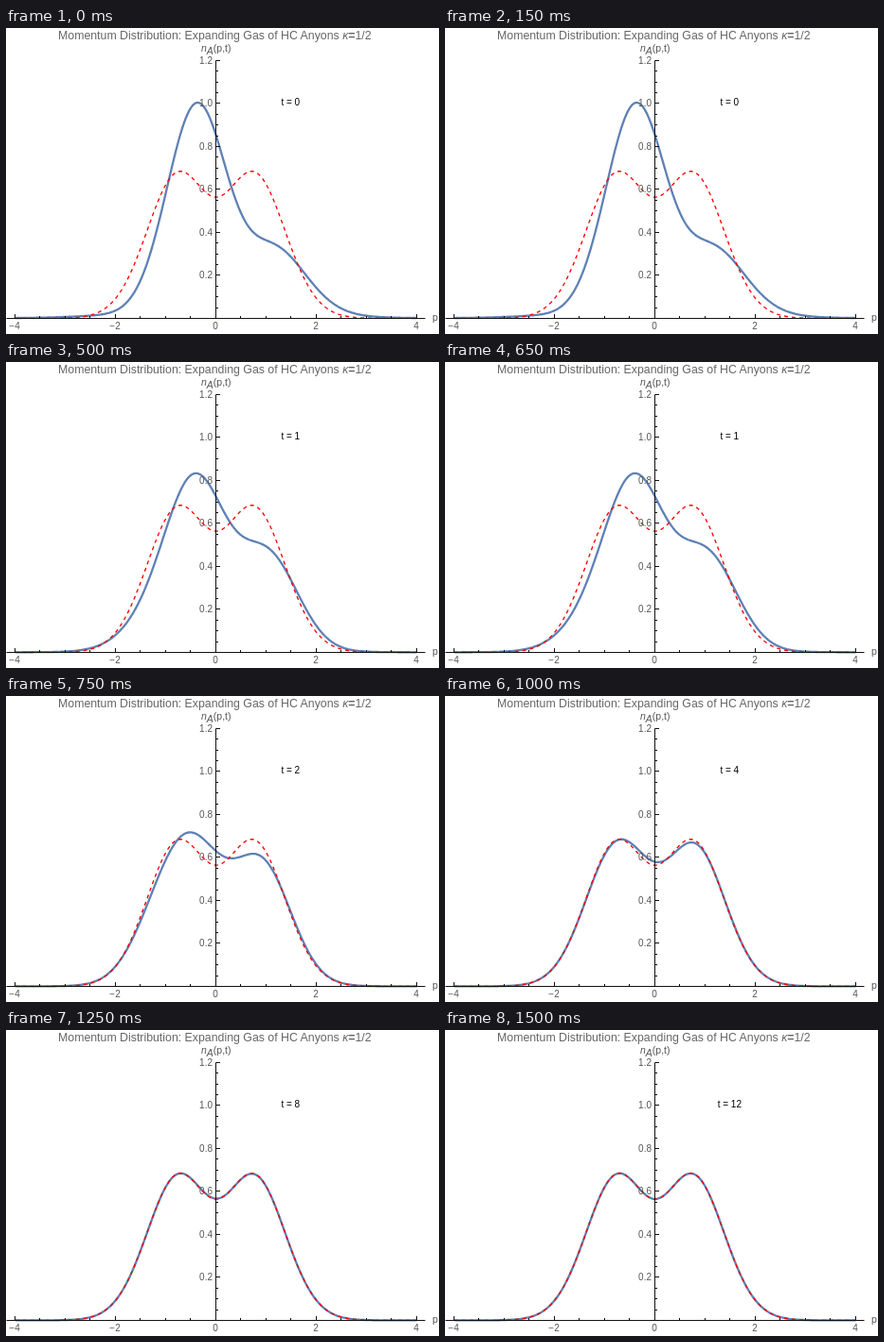
Write an HTML page that moves like this. It is 457x324 px and loops after 1.75 s.

```html
<!DOCTYPE html>
<html lang="en">
<head>
<meta charset="utf-8">
<title>Momentum distribution</title>
<style>
html, body { margin: 0; width: 100%; height: 100%; overflow: hidden; background: #fff; }
svg { display: block; }
text { font-family: "Liberation Sans", Arial, sans-serif; font-size: 10px; fill: #555; }
.title { font-size: 12.33px; fill: #666; }
.label { font-size: 10.5px; }
#time { fill: #000; }
path { fill: none; }
#axes { stroke: #111; }
#gas { stroke: #5e81b5; stroke-width: 2.3; stroke-linejoin: round; }
#limit { stroke: #f00; stroke-width: 1.35; stroke-dasharray: 4 4; }
</style>
</head>
<body>
<svg width="457" height="324" viewBox="0 0 457 324">
  <g transform="translate(.5 .5)">
    <path id="gas"/>
    <path id="limit"/>
    <path id="axes"/>
  </g>
  <g id="ticks"></g>
  <text class="title" x="55" y="12">Momentum Distribution: Expanding Gas of HC Anyons <tspan font-style="italic">κ</tspan><tspan font-weight="bold">=</tspan>1/2</text>
  <text class="label" x="206" y="25"><tspan font-style="italic">n<tspan dy="3">A</tspan></tspan><tspan dy="-3">(p,t)</tspan></text>
  <text class="label" x="450" y="310">p</text>
  <text id="time" x="300.3" y="82" text-anchor="middle"></text>
</svg>
<script>
const $ = id => document.getElementById(id);
const X = p => 221.2 + 53 * p;
const Y = n => 306.9 - 227.5 * n;
const HOLD = 250, TIMES = [0, 0.5, 1, 2, 4, 8, 12];

// Two free fermions in a harmonic trap
const fermions = p => Math.exp(-p * p) * (1 + 2 * p * p) / Math.sqrt(Math.PI);

// Exchange kernel of the pair at separation r, after expanding for time t
function kernel(r, t) {
  const steps = 60, ds = r / steps;
  let sum = 0;
  for (let i = 0; i < steps; i++) {
    const s = (i + 0.5) * ds - r / 2;
    sum += (r * r / 4 - s * s) * Math.exp(-s * s / 2) * Math.cos(s * t * r / 2);
  }
  return Math.sqrt(2 / Math.PI) * Math.exp(-r * r * (2 + t * t) / 8) * sum * ds;
}

// Anyons with statistics 1/2: fermions plus the exchange term
function anyons(t) {
  const dq = 0.1, scale = Math.hypot(1, t);
  const g = Array.from({ length: 120 }, (_, i) => kernel(i * dq / scale, t));
  return p => fermions(p) + dq / Math.PI * g.reduce((sum, k, i) =>
    sum + k * (Math.cos(p * i * dq) - Math.sin(p * i * dq)), 0);
}

function curve(f) {
  const points = [];
  for (let i = -160; i <= 160; i++) points.push(X(i / 40).toFixed(2) + "," + Y(f(i / 40)).toFixed(2));
  return "M" + points.join("L");
}

function drawAxes() {
  let d = "M0 307H442M221 34V307", labels = "";
  const label = (x, y, anchor, s) => labels += `<text x="${x}" y="${y}" text-anchor="${anchor}">${s}</text>`;
  for (let i = -8; i <= 8; i++) {
    const major = i % 4 === 0, x = Math.floor(X(i / 2));
    d += `M${x} 307v${major ? -4.5 : -2.5}`;
    if (major) label(x, 319, "middle", String(i / 2).replace("-", "\u2212"));
  }
  for (let i = 1; i <= 24; i++) {
    const major = i % 4 === 0, y = Math.round(Y(i / 20));
    d += `M221 ${y}h${major ? 4.5 : 2.5}`;
    if (major) label(218, y + 4, "end", (i / 20).toFixed(1));
  }
  $("axes").setAttribute("d", d);
  $("ticks").innerHTML = labels;
}

drawAxes();
$("limit").setAttribute("d", curve(fermions));
const curves = TIMES.map(t => curve(anyons(t)));
let shown = -1;

function draw() {
  const i = Math.floor(performance.now() / HOLD) % TIMES.length;
  if (i !== shown) {
    shown = i;
    $("gas").setAttribute("d", curves[i]);
    $("time").textContent = "t = " + TIMES[i];
  }
  requestAnimationFrame(draw);
}
draw();
</script>
</body>
</html>
```
